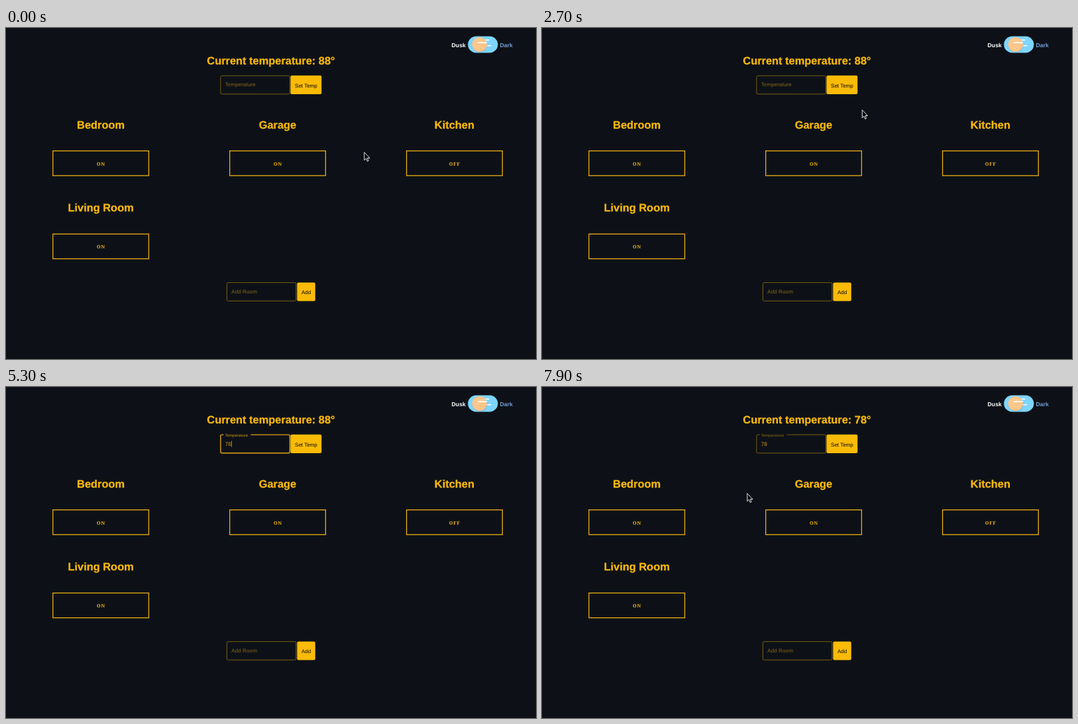
An HTML page that plays this animation: 800 px wide and 500 px high, repeating every 8 s.

```html
<!DOCTYPE html>
<html lang="en">
<head>
<meta charset="utf-8">
<title>Room controls</title>
<style>
  html, body { margin: 0; width: 100%; height: 100%; overflow: hidden; background: #0d1117; }
  svg { display: block; width: 100vw; height: 100vh; }
  text { font-family: "Liberation Sans", Arial, sans-serif; white-space: pre; text-rendering: geometricPrecision; }
  .round { font-size: 16.4px; font-weight: bold; fill: #fab90c; stroke: #fab90c; stroke-width: .25; stroke-linejoin: round; text-anchor: middle; }
  .mode { font-size: 8.7px; font-weight: bold; }
  .state { font: bold 7.2px "Noto Serif", serif; letter-spacing: .8px; fill: #fab90c; text-anchor: middle; }
  .box { fill: none; stroke: #eeae12; stroke-width: 1.3; }
  .field { fill: none; stroke: #86670f; stroke-width: .9; }
  .hint { font-size: 8px; letter-spacing: .12px; fill: #886a16; }
  .value { font-size: 8.2px; fill: #cf9d18; }
  .button { fill: #fabb07; }
  .caption { font-size: 8px; fill: #080704; text-anchor: middle; }
</style>
</head>
<body>
<svg viewBox="0 0 800 500">
  <rect width="800" height="500" fill="#0d1117"/>

  <text class="mode" x="672.6" y="28.8" fill="#fff">Dusk</text>
  <text class="mode" x="745.4" y="28.8" fill="#739dd6">Dark</text>
  <rect x="697.2" y="12.5" width="45.2" height="25" rx="12.5" fill="#7fd5fc"/>
  <g fill="#fff">
    <rect x="714.5" y="17.5" width="15" height="1.5" rx=".75"/>
    <rect x="717.5" y="26" width="15" height="1.5" rx=".75"/>
    <circle cx="715.2" cy="25.7" r="11.3" fill="#4f8ca8" opacity=".35"/>
    <circle cx="714.8" cy="25" r="11.1" fill="#fdc68b"/>
    <rect x="711.5" y="21.3" width="15" height="1.6" rx=".8"/>
  </g>

  <text id="title" class="round" x="400" y="55.2"></text>

  <rect id="tempField" class="field" x="323.9" y="72.1" width="104.6" height="27.7" rx="2"/>
  <rect id="notch" x="328.5" y="70" width="41" height="4" fill="#0d1117"/>
  <text id="label" class="hint">Temperature</text>
  <text id="typed" class="value" x="330.7" y="89.1"></text>
  <rect id="caret" y="81.5" width=".8" height="9" fill="#e0a817"/>
  <rect class="button" x="429.5" y="71.7" width="46.8" height="28.4" rx="2"/>
  <rect id="ring" x="429.1" y="71.1" width="48" height="29.5" rx="2" fill="none" stroke="#fff6e0" stroke-width="1.6"/>
  <text class="caption" x="452.9" y="90">Set Temp</text>

  <g id="rooms"></g>

  <rect class="field" x="333.4" y="384.6" width="104.4" height="27.7" rx="2"/>
  <text class="hint" x="340.2" y="400.7">Add Room</text>
  <rect class="button" x="439.4" y="384.4" width="27.4" height="28.2" rx="2"/>
  <text class="caption" x="453.1" y="402.4">Add</text>

  <path id="arrow" d="M.8 .8V12.6L3.5 10.2L5.3 14.4L7.1 13.6L5.4 9.5H9Z" fill="#050608" stroke="#fff" stroke-width=".9" stroke-linejoin="round"/>
  <g id="beam" fill="none" stroke-linecap="round">
    <path d="M-2.6 -6Q0 -6 0 -4Q0 -6 2.6 -6M0 -4V5M-1.5 1H1.5M-2.6 7Q0 7 0 5Q0 7 2.6 7" stroke="#e6e6e6" stroke-width="2.5"/>
    <path d="M-2.6 -6Q0 -6 0 -4Q0 -6 2.6 -6M0 -4V5M-1.5 1H1.5M-2.6 7Q0 7 0 5Q0 7 2.6 7" stroke="#0c0e12" stroke-width=".9"/>
  </g>
</svg>
<script>
  const LOOP = 8000, STEP = 100;
  const $ = id => document.getElementById(id);
  const [title, field, notch, label, typed, caret, ring, arrow, beam] =
    ["title", "tempField", "notch", "label", "typed", "caret", "ring", "arrow", "beam"].map($);

  const rooms = [["Bedroom", "ON"], ["Garage", "ON"], ["Kitchen", "OFF"], ["Living Room", "ON"]];
  $("rooms").innerHTML = rooms.map(([name, state], i) => {
    const x = 143.1 + (i % 3) * 266.9, y = 151.5 + Math.floor(i / 3) * 125.6;
    return `<text class="round" x="${x}" y="${y}">${name}</text>
      <rect class="box" x="${x - 72.3}" y="${y + 34.1}" width="144.7" height="37.4"/>
      <text class="state" x="${x + .4}" y="${y + 56.1}">${state}</text>`;
  }).join("");

  // Pointer path: time, x, y
  const path = [
    [0, 540, 187], [400, 540, 187], [700, 557, 175], [1600, 557, 175],
    [1800, 564, 173], [2000, 551, 165], [2400, 505, 131], [2600, 505, 131],
    [3000, 415, 99], [3300, 379, 90], [5600, 379, 90], [5900, 428, 88],
    [6200, 463, 86], [6500, 468, 86], [6700, 474, 86], [6800, 474, 86],
    [7100, 527, 90], [7300, 510, 112], [7700, 388, 157], [7900, 309, 160], [8000, 309, 160]
  ];

  function pointerAt(t) {
    const i = path.findIndex(p => p[0] > t);
    const [t0, x0, y0] = path[i - 1], [t1, x1, y1] = path[i];
    const k = (t - t0) / (t1 - t0);
    return [x0 + (x1 - x0) * k, y0 + (y1 - y0) * k];
  }

  const show = (el, on) => el.setAttribute("visibility", on ? "visible" : "hidden");
  const ease = k => k * k * (3 - 2 * k);

  function draw(t) {
    const [x, y] = pointerAt(t);
    const inField = x > 323 && x < 429 && y > 71 && y < 101;
    const focused = t >= 3800 && t < 6600;
    const lift = ease(Math.min(1, Math.max(0, (t - 3700) / 200)));

    title.textContent = `Current temperature: ${t < 6600 ? 88 : 78}°`;
    typed.textContent = t < 5000 ? "" : t < 5300 ? "7" : "78";

    field.style.stroke = focused ? "#e2a512" : inField ? "#b98c12" : "#86670f";
    field.style.strokeWidth = focused ? 1.4 : .9;
    show(notch, t >= 3800);
    label.style.fill = focused ? "#d39b12" : "#886a16";
    label.setAttribute("transform", `translate(330.7 ${88.2 - 13.3 * lift}) scale(${1 - .25 * lift})`);

    caret.setAttribute("x", 330.8 + typed.textContent.length * 4.6);
    show(caret, t >= 4700 && t < 6600);
    show(ring, t >= 6600 && t < 7300);

    const hidden = t >= 5000 && t < 5700;
    show(arrow, !inField && !hidden);
    show(beam, inField && !hidden);
    for (const el of [arrow, beam]) el.setAttribute("transform", `translate(${x} ${y})`);
  }

  const start = performance.now();
  function tick() {
    const elapsed = Math.max(0, performance.now() - start) % LOOP;
    draw(Math.floor(elapsed / STEP) * STEP);
    requestAnimationFrame(tick);
  }
  tick();
</script>
</body>
</html>
```
